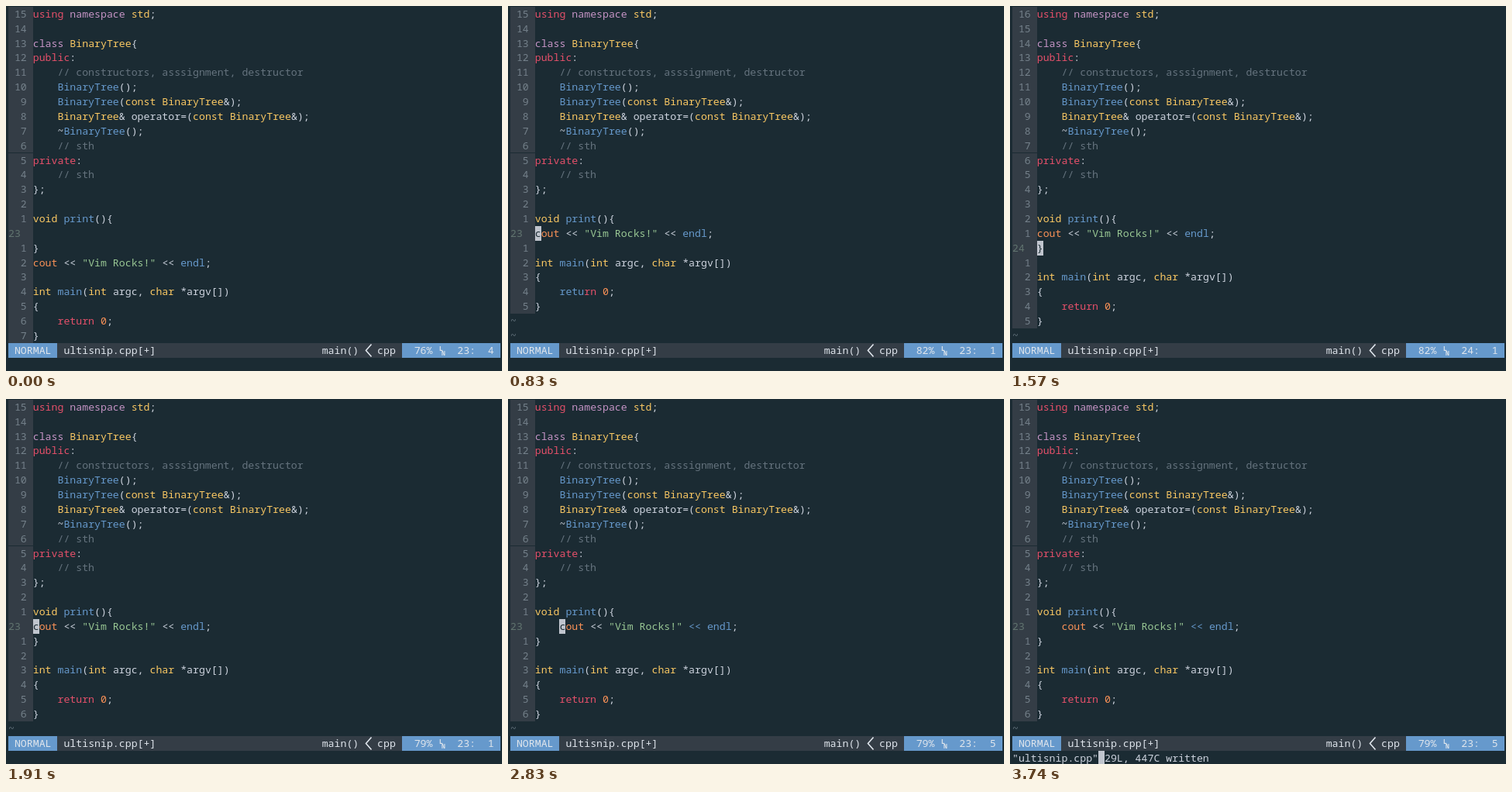
Write an HTML page that moves like this. It is 640 px wide and 471 px high and loops after 3.78 s.

```html
<!DOCTYPE html>
<html lang="en">
<head>
<meta charset="utf-8">
<title>Vim editing session</title>
<style>
  html, body { margin: 0; width: 100%; height: 100%; overflow: hidden; background: #1b2b33; }
  #screen, svg { position: absolute; left: 0; top: 0; width: 640px; height: 471px; overflow: hidden; }
  #screen, svg { font: 13.22px/18.87px "Noto Sans Mono", "DejaVu Sans Mono", monospace; }
  #screen span { position: absolute; height: 18.87px; white-space: pre; font-variant-ligatures: none; }
</style>
</head>
<body>
<div id="screen"></div>
<svg viewBox="0 0 640 471" fill="#dfe5ec">
  <path d="M471.5 436.5L464.5 444.5L471.5 452.5" fill="none" stroke="#dfe5ec" stroke-width="1.6"/>
  <g font-size="8" font-weight="700"><text x="559" y="445">L</text><text x="562" y="451">N</text></g>
</svg>
<script>
const LOOP = 3780, CELL_W = 7.935, CELL_H = 18.87, LEFT = 3, TOP = 0.8;
const GUTTER = 4, TOP_LINE = 8, ROWS = 23, STATUS = 23, COMMAND = 24;
const BG = '#1b2b33', PANEL = '#343d46', BLUE = '#6699cc', CURSOR = '#c0c5ce', LIGHT = '#dfe5ec';
const INK = {
  w: '#cdd3de', r: '#e5506a', o: '#f99157', y: '#fac863', g: '#99c794',
  b: BLUE, p: '#c594c5', c: '#65737e'
};

// "^x" switches the ink colour for the text that follows.
const head = [
  '^rusing ^pnamespace ^ystd^w;', '', '^pclass ^yBinaryTree^w{', '^rpublic^w:',
  '^c    // constructors, asssignment, destructor',
  '^b    BinaryTree^w();',
  '^b    BinaryTree^w(^yconst BinaryTree^w&);',
  '^y    BinaryTree^w& operator=(^yconst BinaryTree^w&);',
  '^w    ~^bBinaryTree^w();', '^c    // sth', '^rprivate^w:', '^c    // sth', '^w};', '',
  '^yvoid ^bprint^w(){'
];
const makeTail = keyword => [
  '', '^yint ^bmain^w(^yint ^wargc, ^ychar ^w*argv[])', '^w{', `    ${keyword} ^o0^w;`, '^w}'
];
const tail = makeTail('^rreturn');
const print = '^ocout ^w<< ^g"Vim Rocks!" ^w<< ^bendl^w;';
const indented = '^o    cout ^w<< ^g"Vim Rocks!" ^b<< endl^w;';
const close = '^w}';

const before = ['', close, print, ...tail];
const cut = [print, ...makeTail('^bretu^rrn')];
const pasted = [print, '', close, ...tail];
const trimmed = [print, close, ...tail];
const done = [indented, close, ...tail];

const steps = [
  { at: 0, body: before, line: 23, col: 4, hidden: true },
  { at: 120, body: before, line: 23, col: 4 },
  { at: 280, body: before, line: 23, col: 4, keys: 'd' },
  { at: 360, body: cut, line: 23, col: 1 },
  { at: 860, body: pasted, line: 24, col: 4, trailing: 3 },
  { at: 1430, body: pasted, line: 24, col: 4, trailing: 3, keys: 'd' },
  { at: 1520, body: trimmed, line: 24, col: 1 },
  { at: 1740, body: trimmed, line: 23, col: 1 },
  { at: 2040, body: trimmed, line: 23, col: 1, keys: '>' },
  { at: 2160, body: done, line: 23, col: 5 },
  { at: 3020, body: done, line: 23, col: 5, command: ':', commandCol: 1 },
  { at: 3390, body: done, line: 23, col: 5, command: ':w', commandCol: 2 },
  { at: 3700, body: done, line: 23, col: 5, command: '"ultisnip.cpp" 29L, 447C written', commandCol: 14 }
];

const screen = document.getElementById('screen');

function put(row, col, text, color, background = '') {
  const span = document.createElement('span');
  span.textContent = text;
  Object.assign(span.style, {
    left: LEFT + col * CELL_W + 'px', top: TOP + row * CELL_H + 'px',
    width: text.length * CELL_W + 'px', color, background
  });
  screen.append(span);
}

function putCode(row, source) {
  let col = GUTTER, ink = 'w';
  source.split('^').forEach((part, i) => {
    if (i) { ink = part[0]; part = part.slice(1); }
    if (part) put(row, col, part, INK[ink]);
    col += part.length;
  });
}

function draw({ body, line, col, hidden, trailing, keys, command, commandCol }) {
  screen.textContent = '';
  const lines = [...head, ...body], current = line - TOP_LINE;
  const total = TOP_LINE + lines.length - 1;

  for (let row = 0; row < ROWS; row++) {
    if (row >= lines.length) { put(row, 0, '~', INK.c); continue; }
    const number = row === current ? String(line).padEnd(4)
      : String(Math.abs(row - current)).padStart(3) + ' ';
    put(row, 0, number, row === current ? '#61746f' : '#74808a', PANEL);
    putCode(row, lines[row]);
  }

  if (trailing) put(current, GUTTER, ' '.repeat(trailing), '', '#ee0011');
  if (!hidden && !command) {
    const letter = lines[current].replace(/\^./g, '')[col - 1] || ' ';
    put(current, GUTTER + col - 1, letter, BG, CURSOR);
  }

  put(STATUS, 0, ' '.repeat(80), '', PANEL);
  put(STATUS, 0, ' NORMAL ', LIGHT, BLUE);
  put(STATUS, 9, 'ultisnip.cpp[+]', LIGHT);
  put(STATUS, 51, 'main()', LIGHT);
  put(STATUS, 60, 'cpp', LIGHT);
  const percent = Math.floor(100 * line / total);
  put(STATUS, 64, `  ${percent}%    ${line}:  ${col} `, LIGHT, BLUE);

  if (keys) put(COMMAND, 69, keys, INK.w);
  if (command) {
    put(COMMAND, 0, command, INK.w);
    put(COMMAND, commandCol, ' ', BG, CURSOR);
  }
}

let shown;
function tick() {
  const time = performance.now() % LOOP;
  const step = steps.findLast(s => s.at <= time);
  if (step !== shown) draw(shown = step);
  requestAnimationFrame(tick);
}
tick();
</script>
</body>
</html>
```
